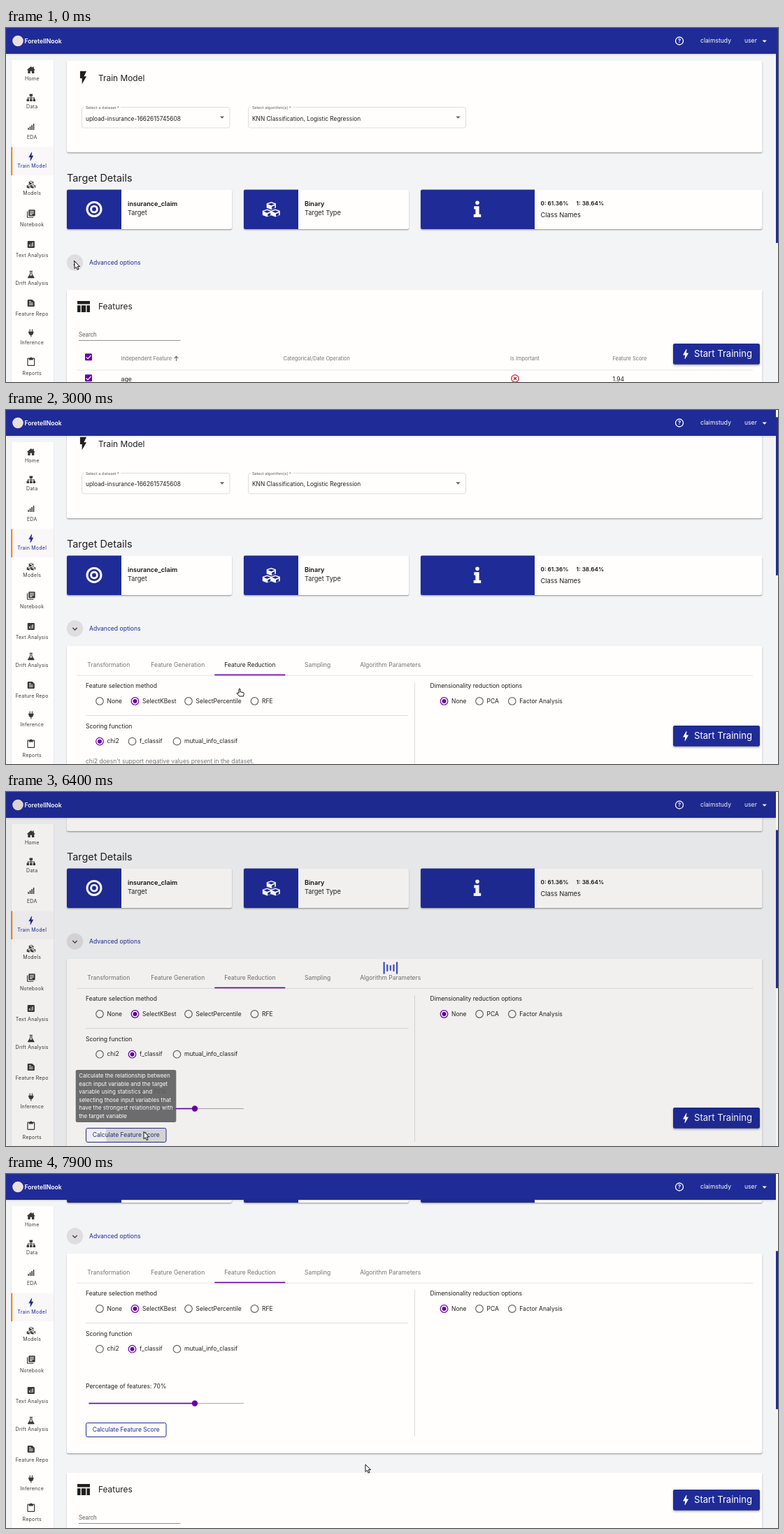
An HTML page with a canvas for the animation above (8000 ms loop, 1104x507 px).

```html
<!DOCTYPE html>
<html lang="en">
<head>
<meta charset="utf-8">
<title>Model training</title>
<style>
html, body { margin: 0; width: 100%; height: 100%; overflow: hidden; background: #f3f4f6; }
canvas { display: block; width: 1104px; height: 507px; }
</style>
</head>
<body>
<canvas id="stage"></canvas>
<script>
const W = 1104, H = 507, LOOP = 8000;
const BLUE = '#1f2b97', PURPLE = '#6a00a8', INK = '#1f1f1f', GREY = '#747474', CARD = '#fffefd';
const SANS = 'Inter, "Open Sans", sans-serif', LABEL = 'Roboto, Arial, sans-serif';

const ratio = window.devicePixelRatio || 1;
function prepare(canvas) {
  canvas.width = W * ratio;
  canvas.height = H * ratio;
  return canvas.getContext('2d');
}
const page = prepare(document.getElementById('stage'));
const layer = prepare(document.createElement('canvas'));
let c = page;

const ICONS = {
  home: 'M12 3L1 12.500h3V21h6v-6h4v6h6v-8.500h3L19 9V4h-3v2.500z',
  tree: 'M8 2h8v6h-3v3h8v4h2v6h-6v-6h2v-2h-6v2h2v6H9v-6h2v-2H5v2h2v6H1v-6h2v-4h8V8H8z',
  bars: 'M3 15h3v6H3zM8 11h3v10H8zM13 7h3v14h-3zM18 3h3v18h-3z',
  flash: 'M7 2v11h3v9l7-12h-4l4-8z',
  spark: 'M11 21h-1l1-7H7.500c-.9 0-.3-.8-.3-.8C8.500 11 10.400 7.500 13 3h1l-1 7h3.500c.4 0 .6.2.4.7C13 17.500 11 21 11 21z',
  books: 'M4 6H2v14a2 2 0 0 0 2 2h14v-2H4zM20 2H8a2 2 0 0 0-2 2v12a2 2 0 0 0 2 2h12a2 2 0 0 0 2-2V4a2 2 0 0 0-2-2zM19 11H9V9h10zM15 15H9v-2h6zM19 7H9V5h10z',
  chart: 'M19 3H5a2 2 0 0 0-2 2v14a2 2 0 0 0 2 2h14a2 2 0 0 0 2-2V5a2 2 0 0 0-2-2zM9 17H7v-5h2zM13 17h-2v-3h2zM13 12h-2v-2h2zM17 17h-2V7h2z',
  flask: 'M8 2h8v2h-1v6l6 10q1 2-1 2H4q-2 0-1-2l6-10V4H8zM11 4v7l-2.500 4h7L13 11V4z',
  page: 'M15 3H5a2 2 0 0 0-2 2v14a2 2 0 0 0 2 2h14a2 2 0 0 0 2-2V9zM7 7h5v2H7zM7 11h10v2H7zM7 15h10v2H7z',
  plug: 'M8 2h2v6h4V2h2v6h3v3h-1c0 4-2 6-5 6.500V22h-2v-4.500c-3-.5-5-2.500-5-6.500H5V8h3z',
  clip: 'M19 3h-4.200a3 3 0 0 0-5.600 0H5a2 2 0 0 0-2 2v15a2 2 0 0 0 2 2h14a2 2 0 0 0 2-2V5a2 2 0 0 0-2-2zM5 5h2v3h10V5h2v15H5z',
  table: 'M2 3h20v5H2zM2 10h5v11H2zM8.500 10h7v11h-7zM17 10h5v11h-5z',
  info: 'M12 1a2.700 2.700 0 0 1 0 5.400a2.700 2.700 0 0 1 0-5.400zM7.500 8.500h7v11H17v4H7v-4h2.500v-7h-2z',
  cube: 'M12 1.800L24 6.200V17.500L12 21.900L0 17.500V6.200zM3 7.900L12 11.600L21 7.900L12 4.600zM13.500 14.500V20.600L21 17.700V11.200z'
};
for (const k in ICONS) ICONS[k] = new Path2D(ICONS[k]);

const CURSORS = {
  arrow: new Path2D('M0 0V10.500L2.500 8.300L4.200 12.200L6 11.400L4.300 7.600H7.500Z'),
  hand: new Path2D('M-1 .8Q0-.6 1 .8V4.800L5 5.500Q6.500 6 6.300 7.500L5.500 11H0L-4 6.800Q-3.400 5.200-1 6.500Z')
};

// Motion helpers
const clamp = v => Math.max(0, Math.min(1, v));
const ramp = (t, a, b) => clamp((t - a) / (b - a));
const smooth = p => p * p * (3 - 2 * p);
const mix = (a, b, p) => a + (b - a) * p;
const pulse = (t, a, b, d, e) => ramp(t, a, b) * (1 - ramp(t, d, e));

function bezier(x1, y1, x2, y2) {
  const at = (a, b, u) => 3 * a * u * (1 - u) ** 2 + 3 * b * u * u * (1 - u) + u ** 3;
  return p => {
    let lo = 0, hi = 1;
    for (let i = 0; i < 24; i++) {
      const m = (lo + hi) / 2;
      if (at(x1, x2, m) < p) lo = m; else hi = m;
    }
    return at(y1, y2, lo);
  };
}
const slideEase = bezier(.35, 0, .25, 1);
const barEase = bezier(.85, .25, .37, .85);

const TAB_CLICK = 2017, PICK = 4800, RUN_CLICK = 6250;
const PATH = [
  [0, 98, 334], [300, 98.5, 334], [800, 98.5, 334], [1700, 352, 383.5], [2200, 352, 383.5],
  [2700, 334, 399], [3110, 334, 399], [3200, 311, 399], [3400, 311, 399], [3700, 287, 404],
  [4280, 287, 404], [4650, 181, 374], [4850, 181, 374], [5100, 190, 456], [5400, 197, 486.5],
  [6450, 197, 486.5], [6850, 514, 416], [8000, 514, 416]
];
const SHAPES = [
  [0, 'arrow'], [50, 'hand'], [850, 'arrow'], [1550, 'hand'], [3250, 'beam'], [4350, 'arrow'],
  [4600, 'hand'], [4900, 'arrow'], [5300, 'hand'], [6340, 'arrow']
];

const scrollAt = t =>
  61 * smooth(ramp(t, 2930, 3100)) + 61 * smooth(ramp(t, 3400, 3620)) +
  62.5 * smooth(ramp(t, 7350, 7600)) + 62.5 * smooth(ramp(t, 7620, 7880));

// Drawing helpers
function text(s, x, y, size, color = INK, o = {}) {
  c.font = `${o.weight || 400} ${size}px ${o.font || SANS}`;
  c.letterSpacing = (o.space || 0) + 'px';
  c.textAlign = o.align || 'left';
  c.textBaseline = 'middle';
  c.fillStyle = color;
  c.fillText(s, x, y);
}

function rect(x, y, w, h, color) {
  c.fillStyle = color;
  c.fillRect(x, y, w, h);
}

function round(x, y, w, h, r) {
  c.beginPath();
  c.roundRect(x, y, w, h, r);
}

function shadowed(draw, alpha = .36, blur = 1.8, dy = 1.3) {
  c.save();
  c.shadowColor = `rgba(0,0,0,${alpha})`;
  c.shadowBlur = blur * ratio;
  c.shadowOffsetY = dy * ratio;
  draw();
  c.restore();
}

function card(x, y, w, h) {
  shadowed(() => {
    round(x, y, w, h, 2);
    c.fillStyle = CARD;
    c.fill();
  });
}

function line(color, width, ...pts) {
  c.beginPath();
  for (let i = 0; i < pts.length; i += 2) c.lineTo(pts[i], pts[i + 1]);
  c.strokeStyle = color;
  c.lineWidth = width;
  c.stroke();
}

function disc(x, y, r, color) {
  c.beginPath();
  c.arc(x, y, r, 0, 7);
  c.fillStyle = color;
  c.fill();
}

function ring(x, y, r, width, color) {
  c.beginPath();
  c.arc(x, y, r, 0, 7);
  c.strokeStyle = color;
  c.lineWidth = width;
  c.stroke();
}

function icon(name, x, y, size, color) {
  c.save();
  c.translate(x, y);
  c.scale(size / 24, size / 24);
  c.translate(-12, -12);
  c.fillStyle = color;
  c.fill(ICONS[name], 'evenodd');
  c.restore();
}

function cubes(x, y, size, color) {
  const s = size * .53;
  icon('cube', x, y - size * .21, s, color);
  icon('cube', x - size * .235, y + size * .21, s, color);
  icon('cube', x + size * .235, y + size * .21, s, color);
}

function caret(x, y, color) {
  c.beginPath();
  c.moveTo(x - 3.2, y - 1.6);
  c.lineTo(x + 3.2, y - 1.6);
  c.lineTo(x, y + 1.7);
  c.fillStyle = color;
  c.fill();
}

function radio(x, y, label, on) {
  ring(x, y, 5.3, 1.2, on ? PURPLE : '#666');
  if (on) disc(x, y, 3, PURPLE);
  text(label, x + 10.5, y, 8.5);
}

function checkbox(x, y) {
  round(x - 5, y - 5, 10, 10, 1.2);
  c.fillStyle = PURPLE;
  c.fill();
  line('#fff', 1.2, x - 3.3, y + .2, x - 1, y + 2.5, x + 3.5, y - 2.4);
}

// Drawn on its own layer so that box and text fade as one
function tooltip(x, y, w, lines, alpha) {
  if (alpha <= 0) return;
  c = layer;
  c.setTransform(ratio, 0, 0, ratio, 0, 0);
  c.clearRect(0, 0, W, H);
  round(x, y, w, lines.length * 11.5 + 6, 2.3);
  c.fillStyle = 'rgba(97,97,97,.92)';
  c.fill();
  lines.forEach((s, i) => text(s, x + 4.5, y + 8.8 + i * 11.5, 8, '#fff'));
  c = page;
  c.globalAlpha = alpha;
  c.drawImage(layer.canvas, 0, 0, W, H);
  c.globalAlpha = 1;
}

function ripple(x, y, r, alpha, bx, by, bw, bh) {
  if (alpha <= 0 || r <= 0) return;
  c.save();
  c.beginPath();
  c.rect(bx, by, bw, bh);
  c.clip();
  disc(x, y, r, `rgba(0,0,0,${alpha})`);
  c.restore();
}

function select(x, w, label, gap, value) {
  round(x + .5, 113.5, w, 29.5, 3);
  c.strokeStyle = '#dedddd';
  c.lineWidth = 1;
  c.stroke();
  rect(x + 4, 112, gap, 3, CARD);
  text(label, x + 6, 114.3, 6.1, '#666', { font: LABEL });
  text(value, x + 6, 130, 8.35);
  caret(x + w - 10.5, 128, '#666');
}

// Page sections
function topCards() {
  card(87, 47, 994.5, 131);
  icon('flash', 110.5, 71, 22, INK);
  text('Train Model', 132, 72, 11.9);
  select(108, 211.5, 'Select a dataset *', 52, 'upload-insurance-1662615745608');
  select(346, 311, 'Select algorithm(s) *', 61, 'KNN Classification, Logistic Regression');

  text('Target Details', 87, 216, 14.4);
  for (const [x, w, b] of [[87, 236, 78], [340, 236, 78], [593, 488.5, 163]]) {
    card(x, 231.5, w, 56.5);
    round(x, 231.5, b, 56.5, [2, 0, 0, 2]);
    c.fillStyle = BLUE;
    c.fill();
  }
  ring(126, 259.5, 10, 3, '#fff');
  ring(126, 259.5, 4.4, 2.9, '#fff');
  cubes(379.3, 259.8, 25, '#fff');
  icon('info', 674, 259, 25, '#fff');
  const bold = { weight: 600 };
  text('insurance_claim', 174, 252, 9.1, '#111', bold);
  text('Target', 174, 265.5, 9.2);
  text('Binary', 427, 252, 9.1, '#111', bold);
  text('Target Type', 427, 265.5, 9.2);
  text('0: 61.36%', 764.5, 252, 8.2, '#111', bold);
  text('1: 38.64%', 815.5, 252, 8.2, '#111', bold);
  text('Class Names', 764.5, 268, 9.3);
}

function advancedButton(open) {
  disc(98.5, 336, 11.7, '#dfdddd');
  c.save();
  c.translate(98.5, 336.5);
  c.rotate((open - 1) * Math.PI / 2);
  line('#333', 1.3, -3.2, -1.6, 0, 1.6, 3.2, -1.6);
  c.restore();
  text('Advanced options', 119, 336, 8.6, BLUE);
}

function transformTab() {
  text('Standardization options', 114, 418.5, 8.5);
  radio(134, 440, 'None', true);
  radio(189.5, 440, 'Standard Scaler');
  radio(284, 440, 'Robust Scaler');
  line('#dedddd', 1, 114, 460.5, 655, 460.5);
  text('Missing value methods', 114, 481, 8.5);
}

function reductionTab(t) {
  const picked = t >= PICK;
  text('Feature selection method', 114, 418.5, 8.5);
  radio(134, 440, 'None');
  radio(184.5, 440, 'SelectKBest', true);
  radio(261, 440, 'SelectPercentile');
  radio(355.5, 440, 'RFE');
  line('#dedddd', 1, 114, 460.5, 575.5, 460.5);
  text('Scoring function', 114, 476, 8.5);
  radio(134, 497.7, 'chi2', !picked);
  radio(180.5, 497.7, 'f_classif', picked);
  radio(244.5, 497.7, 'mutual_info_classif');
  if (!picked) text("chi2 doesn't support negative values present in the dataset.", 114, 526.5, 8.5, GREY);
  text('Percentage of features: 70%', 114, 551, 8.5);
  rect(118.5, 574.9, 221.5, 1.2, '#b5b3b3');
  rect(118.5, 574.7, 151.5, 1.6, PURPLE);
  disc(270, 575.5, 4.2, PURPLE);

  round(114.5, 603.5, 114.5, 20, 2.3);
  c.strokeStyle = BLUE;
  c.lineWidth = 1;
  c.stroke();
  ripple(197, 610, (t - RUN_CLICK) * .36, .12 * (1 - ramp(t, 6450, 6700)), 115, 604, 113.5, 19);
  text('Calculate Feature Score', 171.7, 613.7, 8.5, BLUE, { align: 'center' });

  line('#dedddd', 1, 584.5, 413, 584.5, 623);
  text('Dimensionality reduction options', 606.5, 418.5, 8.5);
  radio(626.5, 440, 'None', true);
  radio(677, 440, 'PCA');
  radio(723.8, 440, 'Factor Analysis');
}

function advancedPanel(t, height, slide) {
  if (height < 1) return;
  card(87, 361, 994.5, height);
  c.save();
  c.beginPath();
  c.rect(87, 361, 994.5, height);
  c.clip();
  ripple(352, 387, (t - TAB_CLICK) * .55, .15 * (1 - ramp(t, 2180, 2450)), 298, 375, 101, 28);
  const focused = t >= TAB_CLICK && t < PICK;
  const tabs = [['Transformation', 146.7], ['Feature Generation', 245.7], ['Feature Reduction', 348.9],
    ['Sampling', 445.6], ['Algorithm Parameters', 549.7]];
  tabs.forEach(([s, x], i) => text(s, x, 388.6, 8.5, focused && i === 2 ? INK : GREY, { align: 'center' }));
  rect(101, 402.8, 967, .8, '#dcdada');
  rect(mix(101, 298.3, slide), 401.6, mix(92, 101, slide), 1.6, PURPLE);

  c.beginPath();
  c.rect(101, 404, 967, 400);
  c.clip();
  c.translate(-967 * slide, 0);
  if (slide < 1) transformTab();
  c.translate(967, 0);
  if (slide > 0) reductionTab(t);
  c.restore();
}

function featuresCard(y) {
  c.save();
  c.translate(0, y);
  card(87, 0, 994.5, 480);
  icon('table', 111, 24, 21.5, INK);
  text('Features', 132, 24.3, 11.9);
  text('Search', 104, 64.3, 8.4, '#666', { font: LABEL });
  rect(104, 72, 145.5, .8, '#777');
  checkbox(118, 96.2);
  text('Independent Feature', 164.5, 98.7, 7.4, GREY);
  line('#666', 1.1, 243.5, 102, 243.5, 95.5);
  line('#666', 1.1, 240.8, 98, 243.5, 95.3, 246.2, 98);
  text('Categorical/Date Operation', 396.5, 98.7, 7.4, GREY);
  text('Is Important', 721, 98.7, 7.4, GREY);
  text('Feature Score', 867.5, 98.7, 7.4, GREY);
  rect(101, 114.6, 967, .8, '#dedddd');
  checkbox(118, 126.3);
  text('age', 164.5, 128.5, 8.8);
  ring(728, 127, 5.2, 1.2, '#d3122e');
  line('#d3122e', 1.2, 726, 125, 730, 129);
  line('#d3122e', 1.2, 730, 125, 726, 129);
  text('1.94', 867.5, 128.5, 8.5);
  c.restore();
}

function sidebar() {
  shadowed(() => rect(8, 46, 60, 480, CARD), .12);
  rect(8, 170.5, 60, 40.5, '#f9f7f7');
  rect(7.3, 170.5, 1.8, 40.5, '#e07c14');
  const items = [
    ['home', 60, 72.5, 'Home', 13.5], ['tree', 100, 113, 'Data', 13.5], ['bars', 141.5, 157, 'EDA', 12],
    ['spark', 184, 197.5, 'Train Model', 16], ['cubes', 224.5, 237, 'Models', 12.5],
    ['books', 266, 281.5, 'Notebook', 14], ['chart', 310, 325.5, 'Text Analysis', 13.5],
    ['flask', 353, 365.5, 'Drift Analysis', 12.5], ['page', 394, 410, 'Feature Repo', 13.5],
    ['plug', 437, 450.5, 'Inference', 13], ['clip', 478, 494.5, 'Reports', 14.5]
  ];
  for (const [name, iy, ty, label, size] of items) {
    const color = name === 'spark' ? BLUE : '#383838';
    if (name === 'cubes') cubes(36, iy, size, color);
    else icon(name, 35.8, iy, size, color);
    text(label, 37.2, ty, 7, color, { align: 'center', space: .25 });
  }
}

function header() {
  shadowed(() => rect(0, 0, 1101, 37, BLUE), .2, 3, .8);
  disc(17, 18.5, 7.8, '#e9e0dd');
  text('ForetellNook', 26.5, 19.2, 8.7, '#fff', { weight: 600 });
  ring(963, 18.5, 5.5, 1.3, '#fff');
  text('?', 963, 18.7, 8, '#fff', { align: 'center', weight: 700 });
  text('claimstudy', 993, 18.7, 8.6, '#fff');
  text('user', 1056, 18.7, 8.6, '#fff');
  caret(1084.7, 19, '#fff');
}

function startButton() {
  shadowed(() => {
    round(954, 452, 124, 29.8, 2.3);
    c.fillStyle = BLUE;
    c.fill();
  }, .35, 3, 1.4);
  icon('spark', 972, 467, 18.5, '#fff');
  text('Start Training', 984, 467, 13.1, '#fff');
}

function scrollbar(scroll, total) {
  rect(1101, 0, 3, H, '#f6f6f7');
  rect(1101, scroll * H / total, 3, H * H / total, BLUE);
}

function loader(t, alpha) {
  if (alpha <= 0) return;
  rect(0, 0, 1101, H, `rgba(0,0,0,${.32 * alpha})`);
  c.save();
  c.globalAlpha = clamp(alpha * 5);
  for (let i = -2; i <= 2; i++) {
    const raw = (t - 6400 - Math.abs(i) * 140) / 900 + .5;
    const p = raw - Math.floor(raw);
    const s = p < .5 ? mix(1, .4, barEase(p * 2)) : mix(.4, 1, barEase(p * 2 - 1));
    round(548.7 + i * 4.6, 252 - 10 * s, 2.3, 20 * s, 1.1);
    c.fillStyle = '#2237b0';
    c.fill();
  }
  c.restore();
}

function pointer(t) {
  let i = 0;
  while (i < PATH.length - 2 && t >= PATH[i + 1][0]) i++;
  const a = PATH[i], b = PATH[i + 1];
  const p = smooth(ramp(t, a[0], b[0]));
  const shape = SHAPES.filter(s => s[0] <= t).pop()[1];
  c.save();
  c.translate(mix(a[1], b[1], p), mix(a[2], b[2], p));
  if (shape === 'beam') {
    for (const [color, w] of [['#fff', 2.4], ['#111', 1.1]]) {
      line(color, w, 0, -4.5, 0, 4.5);
      line(color, w, -2.3, -4.7, 2.3, -4.7);
      line(color, w, -2.3, 4.7, 2.3, 4.7);
    }
  } else {
    c.fillStyle = '#fff';
    c.fill(CURSORS[shape]);
    c.strokeStyle = '#111';
    c.lineWidth = 1;
    c.lineJoin = 'round';
    c.stroke(CURSORS[shape]);
  }
  c.restore();
}

function draw(t) {
  const open = smooth(ramp(t, 450, 700));
  const p = ramp(t, TAB_CLICK, TAB_CLICK + 500);
  const slide = p > 0 && p < 1 ? slideEase(p) : p;
  const grow = 38 * slide;
  const featuresY = 375 + 262 * open + grow;
  const scroll = scrollAt(t);

  c.setTransform(ratio, 0, 0, ratio, 0, 0);
  rect(0, 0, W, H, '#f3f4f6');
  c.save();
  c.translate(0, -scroll);
  topCards();
  advancedButton(open);
  advancedPanel(t, 248 * open + grow, slide);
  featuresCard(featuresY);
  c.restore();

  sidebar();
  startButton();
  header();
  loader(t, pulse(t, 6350, 6650, 6930, 7200));
  scrollbar(scroll, featuresY + 460);
  tooltip(277, 404, 144, ['Features reduction are done by', 'selecting best features and',
    'applying dimensionality reduction', 'techniques'], pulse(t, 1720, 1870, 1990, 2120));
  tooltip(99.7, 398, 143.6, ['Calculate the relationship between', 'each input variable and the target',
    'variable using statistics and', 'selecting those input variables that',
    'have the strongest relationship with', 'the target variable'], pulse(t, 5500, 5650, 6480, 6600));
  pointer(t);
}

const start = performance.now();
function tick() {
  draw((performance.now() - start) % LOOP);
  requestAnimationFrame(tick);
}
tick();
</script>
</body>
</html>
```
